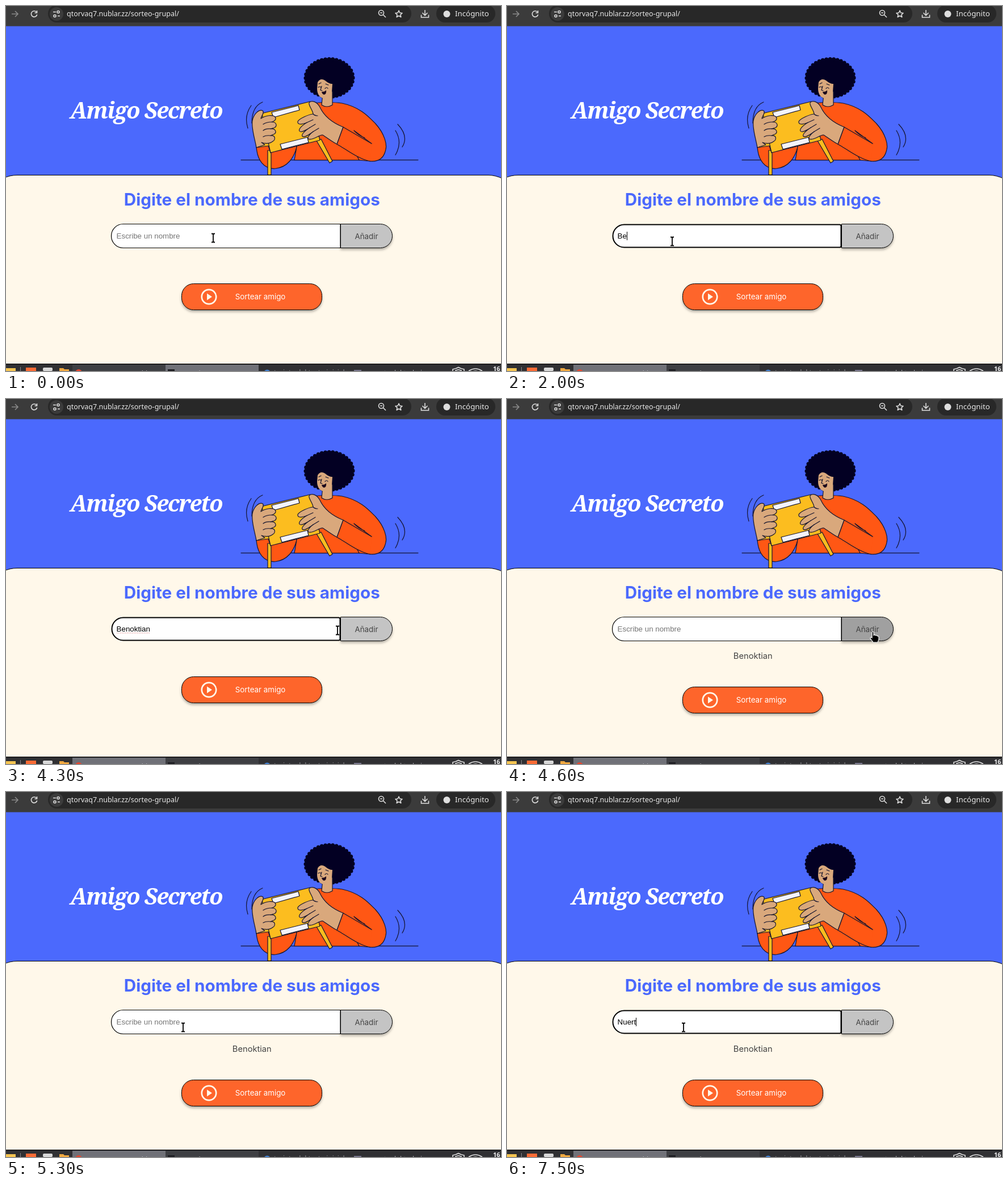
Animation, 872 px wide and 642 px high, one loop 8000 ms. Source, as an HTML page:

```html
<!DOCTYPE html>
<html lang="es">
<head>
<meta charset="utf-8">
<title>Amigo Secreto</title>
<style>
  html, body { margin: 0; width: 100%; height: 100%; overflow: hidden; background: #fff8ea; }
  svg { display: block; width: 872px; height: 642px; }
  text { white-space: pre; }
  .ui { font-family: "Noto Sans", sans-serif; }
  .inter { font-family: Inter, sans-serif; }
  .field { font: 13.333px "Liberation Sans", Arial, sans-serif; }
  .line, .shape { stroke: #15152f; stroke-width: 1.2; stroke-linecap: round; stroke-linejoin: round; }
  .line { fill: none; }
  .icon { fill: none; stroke: #dedede; stroke-width: 1.6; }
  .orange { fill: #ff5714; }
  .yellow { fill: #fcbd1f; }
  .skin { fill: #d9a87c; }
  .shadow { filter: drop-shadow(0 3px 2px rgba(0, 0, 0, .3)); }
</style>
</head>
<body>
<svg viewBox="0 0 872 642">
  <!-- page -->
  <rect width="872" height="642" fill="#4b69fd"/>
  <text x="113" y="198" fill="#fff" font-family="Noto Serif, serif" font-size="40" font-weight="700" font-style="italic" letter-spacing="-1.8">Amigo Secreto</text>

  <!-- illustration -->
  <g>
    <path class="line" d="M414 270.800H726M432 175Q419 193 426 215M452 169Q433 177 433 206M686 219Q699 240 686 262M690 208Q710 229 698 248"/>
    <path class="shape orange" d="M441 246C442 272 455 287 474 286C495 284 508 268 513 244Z"/>
    <path class="shape orange" d="M536 171Q570 168 592 171C625 178 640 196 651 207C668 226 671 244 669 252C666 268 656 274 642 273L622 271H508L516 225Z"/>
    <path class="line" d="M613 219L644 242M613 219Q620 227 632 232M622 271L618 263"/>
    <path class="shape yellow" d="M461 254H467V297H461ZM547 237L570 276L575 273L555 234Z"/>
    <path class="shape yellow" d="M446 190L536 168L553 236L466 258L462 246L441 249Z"/>
    <path class="line" d="M451 190L466 258"/>
    <path class="shape" fill="#f4f4fa" d="M468 187L515 175L517 183L471 196ZM483 243L531 231L533 240L486 252Z"/>
    <path class="shape skin" d="M441 249C438 232 432 215 434 202C436 190 446 181 452 184C456 187 450 193 449 198C458 192 470 191 474 195C477 199 473 203 468 204C477 204 478 211 473 214L466 216C475 215 477 222 473 225L466 228C475 227 475 235 470 238C464 243 455 242 450 240L456 244Z"/>
    <path class="line" d="M468 204Q459 204 453 208M467 216Q458 215 453 219M466 228Q458 227 453 230"/>
    <path class="shape skin" d="M594 213C574 205 560 193 553 178C548 168 538 165 534 170C532 174 541 184 541 190C532 191 517 198 514 203C513 209 520 209 530 205C520 211 515 217 517 220C520 224 530 217 535 214C526 220 520 226 522 229C526 233 536 224 541 221C534 226 530 232 533 234C540 237 552 226 558 227C566 232 575 239 583 243Z"/>
    <path class="line" d="M530 205L541 200M535 214L545 208M541 221L551 215M541 190Q544 193 549 193"/>
    <path class="shape orange" d="M594 213L583 243C603 255 625 271 642 273L644 242Z" stroke="none" style="stroke: none"/>
    <path class="line" d="M644 242L594 213L583 243C603 255 625 271 642 273"/>
    <ellipse cx="569.500" cy="126.500" rx="41.500" ry="33" fill="#030023" stroke="#030023" stroke-width="7" stroke-linecap="round" stroke-dasharray="0 6.500"/>
    <path class="shape skin" d="M558 154L556 174Q565 180 575 174L575 150Z"/>
    <path class="skin" d="M549 134Q554 126 562 131Q569 137 575 137L574 151Q568 163 558 162C551 160 548 153 548 145Z"/>
    <path class="line" d="M551 137L555 135M563 137L568 139M550 143Q553 141 555 143M562 145Q565 142 567 145M556 141L554 148L557 149"/>
    <path d="M556 151Q562 151 564 148Q565 155 560 156Q557 155 556 151Z" fill="#1c0a1c"/>
  </g>

  <path d="M-4 303Q6 297.500 20 297.500H850Q862 297.500 876 304V650H-4Z" fill="#fff8ea" stroke="#000"/>
  <text class="inter" x="433.300" y="351" text-anchor="middle" fill="#4b69fd" font-size="29.700" font-weight="700">Digite el nombre de sus amigos</text>

  <!-- form -->
  <g class="shadow">
    <path id="add" d="M589.500 383.500H659.500A21 21 0 0 1 659.500 425.500H589.500Z" fill="#c4c4c4" stroke="#000"/>
  </g>
  <text class="inter" x="635" y="410" text-anchor="middle" fill="#444" font-size="13.333">Añadir</text>
  <path id="box" fill="#fff" stroke="#000"/>
  <text id="hint" class="field" x="194.600" y="409" fill="#757575">Escribe un nombre</text>
  <text id="typed" class="field" x="194.600" y="409" fill="#000"></text>
  <path id="squiggle" d="M195 411.500H253" stroke="#e48080" stroke-dasharray="1.500 1.500"/>
  <rect id="caret" y="397" width="1" height="15"/>
  <text id="friend" class="inter" x="433.300" y="457" text-anchor="middle" fill="#444" font-size="14.670">Benoktian</text>

  <g id="draw">
    <rect class="shadow" x="309.500" y="488.500" width="247" height="46" rx="21" fill="#fe652b" stroke="#000"/>
    <circle cx="357.500" cy="511.500" r="12.700" fill="none" stroke="#fff8ea" stroke-width="2.700"/>
    <path d="M354 505.500V517.500L363 511.500Z" fill="#fff8ea"/>
    <text class="inter" x="448" y="516" text-anchor="middle" fill="#fff" font-size="13.333">Sortear amigo</text>
  </g>

  <!-- browser bar -->
  <rect width="872" height="35.500" fill="#3b3b3b"/>
  <rect x="74" y="-2" width="640" height="31" rx="15.500" fill="#282828"/>
  <rect x="758" y="-2" width="104" height="31" rx="15.500" fill="#282828"/>
  <circle cx="89" cy="14" r="12" fill="#3b3b3b"/>
  <path class="icon" d="M10 14H21M16 9L21 14L16 19" style="stroke: #8a8a8a"/>
  <path class="icon" d="M53.500 10.500A5.200 5.200 0 1 0 54.700 15M54.500 8V12H50.500"/>
  <path class="icon" d="M83 10.500H88M91 17.500H95"/>
  <circle class="icon" cx="92" cy="10.500" r="2"/>
  <circle class="icon" cx="86" cy="17.500" r="2"/>
  <circle class="icon" cx="661" cy="12" r="4.500"/>
  <path class="icon" d="M664.500 15.500L669 20M659 12H663"/>
  <path class="icon" stroke-linejoin="round" d="M692 8L693.800 12L698 12.500L694.900 15.400L695.800 19.500L692 17.300L688.200 19.500L689.100 15.400L686 12.500L690.200 12Z"/>
  <path class="icon" d="M738 7V16M733.500 12L738 16.500L742.500 12M731.500 15.500V20H744.500V15.500"/>
  <circle cx="776.500" cy="14" r="6" fill="#dedede"/>
  <g class="ui" fill="#e8e8e8">
    <text x="107" y="18" font-size="12.500">qtorvaq7.nublar.zz/sorteo-grupal/</text>
    <text x="791" y="18" font-size="13.300">Incógnito</text>
  </g>

  <!-- taskbar -->
  <rect y="629" width="872" height="13" fill="#303033"/>
  <rect y="629" width="872" height="1.500" fill="#151517"/>
  <rect x="117" y="631" width="328" height="11" fill="#3e3f43"/>
  <rect id="task" y="631" width="164" height="11" fill="#707178"/>
  <rect y="637" width="17" height="5" fill="#f5c451"/>
  <path d="M25.500 635V642" stroke="#88888c"/>
  <rect x="35" y="636" width="18" height="6" fill="#fb6b35"/>
  <rect x="65" y="636" width="17" height="6" rx="2" fill="#d8d8d8"/>
  <path d="M94 642V637H101L103 639H111V642Z" fill="#f0a840"/>
  <circle cx="128" cy="645" r="6" fill="#e6462e"/>
  <rect x="285" y="639" width="12" height="3" fill="#1d1d22"/>
  <circle cx="460" cy="645" r="5.500" fill="#3f7fd0"/>
  <rect x="613" y="640" width="13" height="2" fill="#77758c"/>
  <g class="ui" font-size="12" fill="#c4c4c8">
    <text x="146" y="651">nueva ventana abierta</text>
    <text x="306" y="651">consola</text>
    <text x="472" y="649" fill="#8d8d92">tarjeta del texto inicial</text>
    <text x="634" y="650" fill="#a5a5aa">carpeta del trabajo</text>
    <text x="858" y="642" font-size="11" font-weight="700" fill="#eee">16</text>
  </g>
  <path class="icon" d="M787 644V639Q793 638 797 635.500Q801 638 807 639V644M792 644V641L797 639.500L802 641V644M815 642Q827 634 839 642M819 645Q827 639 835 645"/>

  <!-- pointer -->
  <g id="pointer">
    <g id="beam" fill="none">
      <path d="M-3-7.500H-1L0-6.500L1-7.500H3M0-6.500V6.500M-3 7.500H-1L0 6.500L1 7.500H3" stroke="#fff" stroke-width="3.500"/>
      <path d="M-3-7.500H-1L0-6.500L1-7.500H3M0-6.500V6.500M-3 7.500H-1L0 6.500L1 7.500H3" stroke="#000" stroke-width="1.800"/>
    </g>
    <path id="hand" d="M-5-8Q-3.500-10-2-8V-2.500Q0-4 1.500-2Q3.500-3 4.500-1Q7-1.500 7 1V5L5 10H-3L-8 3Q-8 0-5 2Z" fill="#000" stroke="#fff" stroke-width="1.200"/>
  </g>
</svg>
<script>
  const LOOP = 8000, STEP = 100;
  const [add, box, hint, typed, squiggle, caret, friend, draw, task, pointer, beam, hand] =
    ['add', 'box', 'hint', 'typed', 'squiggle', 'caret', 'friend', 'draw', 'task', 'pointer', 'beam', 'hand']
      .map(id => document.getElementById(id));

  // Each entry: text and the moments its letters appear.
  const words = [
    { text: 'Benoktian', from: 1600, to: 4600, keys: [1600, 2000, 2200, 2300, 2800, 2800, 2800, 3000, 3200] },
    { text: 'Nuert', from: 6300, to: LOOP, keys: [6300, 6700, 7000, 7300, 7500] }
  ];
  const focusSpans = [[600, 4600], [5500, LOOP]];
  const caretSpans = [[600, 1100], [1600, 3800], [5500, 6000], [6300, LOOP]];
  // time, x, y
  const route = [
    [100, 365, 408], [500, 290, 414], [700, 290, 414], [800, 291, 414], [3900, 291, 414],
    [4300, 584, 407], [4500, 645, 415], [4600, 648, 418], [4700, 648, 418],
    [4800, 560, 421], [5300, 312, 414], [5500, 311, 414], [LOOP, 311, 414]
  ];

  const within = (t, [a, b]) => t >= a && t < b;
  const show = (el, on) => el.setAttribute('visibility', on ? 'visible' : 'hidden');

  function pointerAt(t) {
    const i = route.findIndex(p => p[0] > t);
    if (i === 0) return route[0].slice(1);
    const [t0, x0, y0] = route[i - 1], [t1, x1, y1] = route[i];
    const k = (t - t0) / (t1 - t0);
    return [x0 + (x1 - x0) * k, y0 + (y1 - y0) * k];
  }

  function render(t) {
    const word = words.find(w => within(t, [w.from, w.to]));
    typed.textContent = word ? word.text.slice(0, word.keys.filter(k => k <= t).length) : '';
    show(hint, !word);
    show(squiggle, within(t, [4000, 4600]));

    const focused = focusSpans.some(s => within(t, s));
    box.setAttribute('d', focused
      ? 'M206.500 384.500H586Q588.500 384.500 588.500 387V422Q588.500 424.500 586 424.500H206.500A20 20 0 0 1 206.500 384.500Z'
      : 'M206.500 383.500H589V425.500H206.500A21 21 0 0 1 206.500 383.500Z');
    box.setAttribute('stroke-width', focused ? 2 : 1.2);
    show(caret, caretSpans.some(s => within(t, s)));
    caret.setAttribute('x', Math.round(194.6 + (word ? typed.getComputedTextLength() : 0)));

    const added = t >= 4600;
    show(friend, added);
    draw.setAttribute('transform', `translate(0 ${added ? 18 : 0})`);
    task.setAttribute('x', t < 600 ? 281 : 117);

    const [x, y] = pointerAt(t), over = x > 589;
    pointer.setAttribute('transform', `translate(${Math.round(x)} ${Math.round(y)})`);
    show(beam, !over);
    show(hand, over);
    add.setAttribute('fill', over ? '#a0a0a0' : '#c4c4c4');
  }

  const start = performance.now();
  function tick() {
    const t = (performance.now() - start) % LOOP;
    render(Math.floor(t / STEP) * STEP);
    requestAnimationFrame(tick);
  }
  tick();
</script>
</body>
</html>
```
